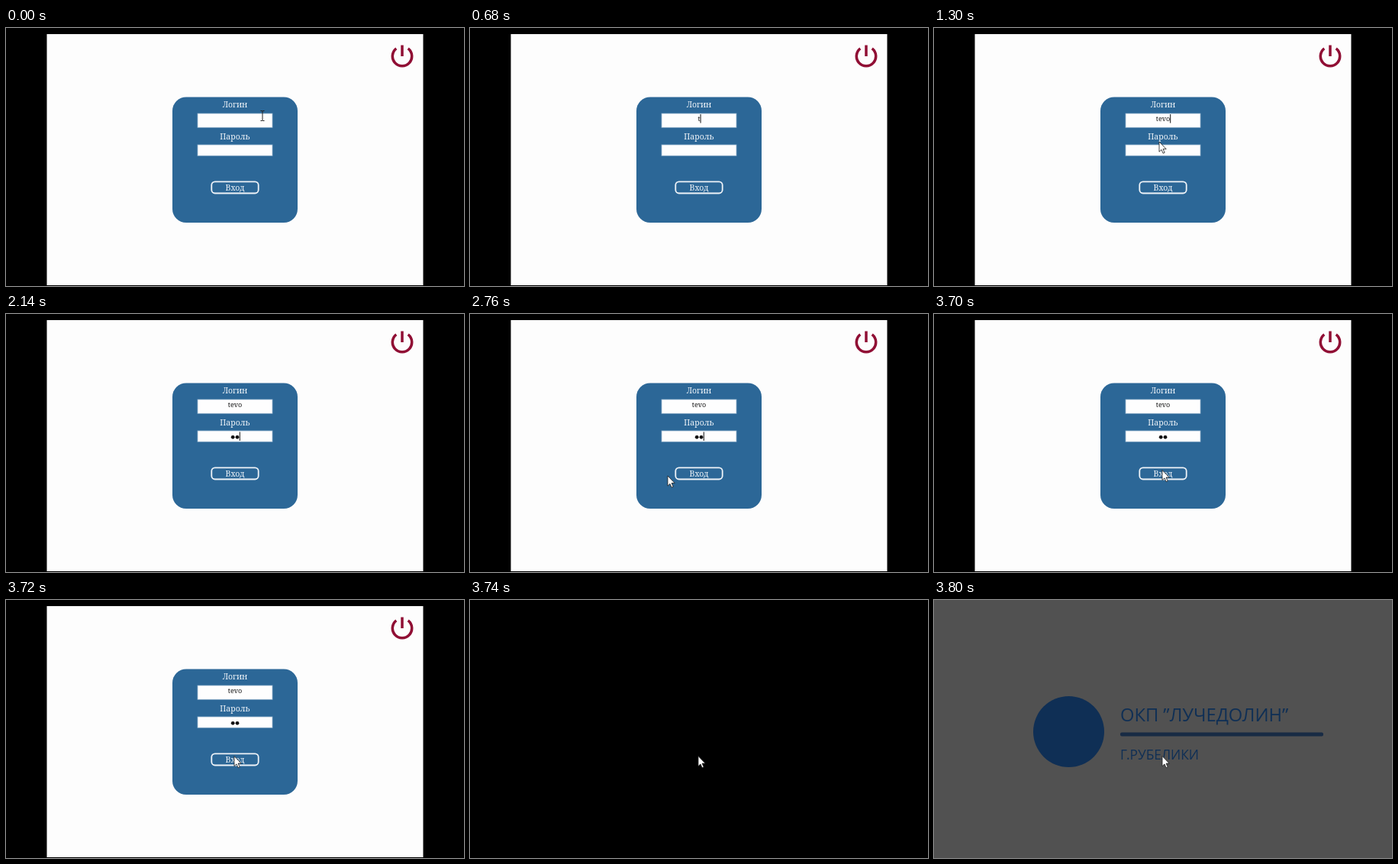
Recreate the animation shown at these times as an HTML page. Size 600x338 px, loop 3.82 s.

```html
<!DOCTYPE html>
<html lang="ru">
<head>
<meta charset="utf-8">
<title>Вход</title>
<style>
  html, body { margin: 0; width: 100%; height: 100%; overflow: hidden; background: #000; }
  svg { display: block; width: 100%; height: 100%; }
  .label { font: 10.5px "Noto Serif", serif; fill: #f2f6fa; text-anchor: middle; }
  .value { font: 9px "Noto Serif", serif; fill: #151515; text-anchor: middle; }
  .field { fill: #fefefe; stroke: #8fb0cb; stroke-width: .8; }
  .brand { font-family: "Open Sans", "Noto Sans", sans-serif; fill: #0f2f55; }
</style>
</head>
<body>
<svg viewBox="0 0 600 338">
  <rect width="600" height="338" fill="#000"/>

  <g id="form">
    <rect x="53.5" y="8" width="493" height="329" fill="#fdfdfd"/>
    <g fill="none" stroke="#900e34" stroke-width="3.5">
      <path d="M511.3 26.9A12.7 12.7 0 1 0 526.7 26.9"/>
      <path d="M519 22.5V37"/>
    </g>
    <rect x="218" y="90.5" width="164" height="164.5" rx="18" fill="#2c6797"/>
    <text class="label" x="300" y="104">Логин</text>
    <rect class="field" x="251" y="112" width="98" height="18.3"/>
    <text class="label" x="300" y="145.5">Пароль</text>
    <rect class="field" x="251" y="153" width="98" height="14.3"/>
    <rect x="269.3" y="201.3" width="61.4" height="15.2" rx="4.5" fill="none" stroke="#eef3f8" stroke-width="1.8"/>
    <text class="label" x="300" y="212.5">Вход</text>
    <text class="value" id="login" x="300" y="122"></text>
    <g fill="#111">
      <circle class="dot" cy="161.3" r="2.4"/>
      <circle class="dot" cy="161.3" r="2.4"/>
    </g>
    <rect id="caret" width="1" height="11.5" fill="#111"/>
  </g>

  <g id="splash">
    <rect width="600" height="338" fill="#515151"/>
    <circle cx="176.5" cy="172.5" r="46.5" fill="#0f2f55"/>
    <text class="brand" x="244" y="159" font-size="23.7">ОКП ”ЛУЧЕДОЛИН”</text>
    <rect x="244" y="173.5" width="266" height="5" rx="2" fill="#182b44"/>
    <text class="brand" x="244" y="209" font-size="17.3">Г.РУБЕЛИКИ</text>
  </g>

  <path id="beam" d="M-2.5-6.5H-.7L0-6L.7-6.5H2.5M0-6V6M-2.5 6.5H-.7L0 6L.7 6.5H2.5" fill="none" stroke="#222"/>
  <path id="arrow" d="M0 0V13.2L3 10.4L5.1 15.2L7.2 14.3L5.1 9.6H9.2Z" fill="#fff" stroke="#1a1a1a" stroke-width=".8"/>
</svg>

<script>
const LOOP = 3820, BLACK_AT = 3740, SPLASH_AT = 3800;
const NAME = "tevo";
const LOGIN_KEYS = [600, 740, 880, 1020];
const PASS_KEYS = [1820, 1980];
const LOGIN_FOCUS = 300, PASS_FOCUS = 1500, BLUR = 3540;

// time, x, y of the pointer
const PATH = [
  [0, 336, 115], [180, 320, 120], [1140, 320, 120],
  [1300, 295, 149], [1440, 297, 160], [2420, 297, 160],
  [2660, 262, 209], [2760, 259, 212], [2900, 264, 211],
  [3180, 299, 204.5], [LOOP, 299, 204.5]
];

const $ = id => document.getElementById(id);
const form = $("form"), splash = $("splash"), login = $("login");
const caret = $("caret"), beam = $("beam"), arrow = $("arrow");
const dots = [...document.querySelectorAll(".dot")];

const show = (el, on) => el.setAttribute("visibility", on ? "visible" : "hidden");
const between = (v, a, b) => v >= a && v < b;
const pressed = (keys, t) => keys.filter(k => t >= k).length;

function pointerAt(t) {
  const i = PATH.findIndex(p => p[0] > t);
  const [t0, x0, y0] = PATH[i - 1], [t1, x1, y1] = PATH[i];
  const u = (t - t0) / (t1 - t0), e = u * u * (3 - 2 * u);
  return [x0 + (x1 - x0) * e, y0 + (y1 - y0) * e];
}

function drawPointer(t) {
  const [x, y] = pointerAt(t);
  const typing = between(t, 600, 1140) || between(t, 1820, 2420);
  const inField = between(x, 251, 349) && (between(y, 112, 130.5) || between(y, 153, 167.5));
  for (const el of [beam, arrow]) el.setAttribute("transform", `translate(${x} ${y})`);
  show(beam, inField && !typing);
  show(arrow, !inField && !typing);
}

function drawFields(t) {
  login.textContent = NAME.slice(0, pressed(LOGIN_KEYS, t));
  const n = pressed(PASS_KEYS, t);
  dots.forEach((dot, i) => {
    dot.setAttribute("cx", 300.1 + (i - (n - 1) / 2) * 5.8);
    show(dot, t < BLACK_AT && i < n);
  });

  const inPass = t >= PASS_FOCUS;
  const width = inPass ? n * 5.8 : login.getComputedTextLength();
  caret.setAttribute("x", 300 + width / 2);
  caret.setAttribute("y", inPass ? 154.5 : 113);
  show(caret, between(t, LOGIN_FOCUS, BLUR));
}

function render(t) {
  const black = t >= BLACK_AT;
  form.setAttribute("display", black ? "none" : "inline");
  show(splash, t >= SPLASH_AT);
  if (!black) drawFields(t);
  drawPointer(t);
}

const start = performance.now();
function tick() {
  render((performance.now() - start) % LOOP);
  requestAnimationFrame(tick);
}
render(0);
requestAnimationFrame(tick);
</script>
</body>
</html>
```
